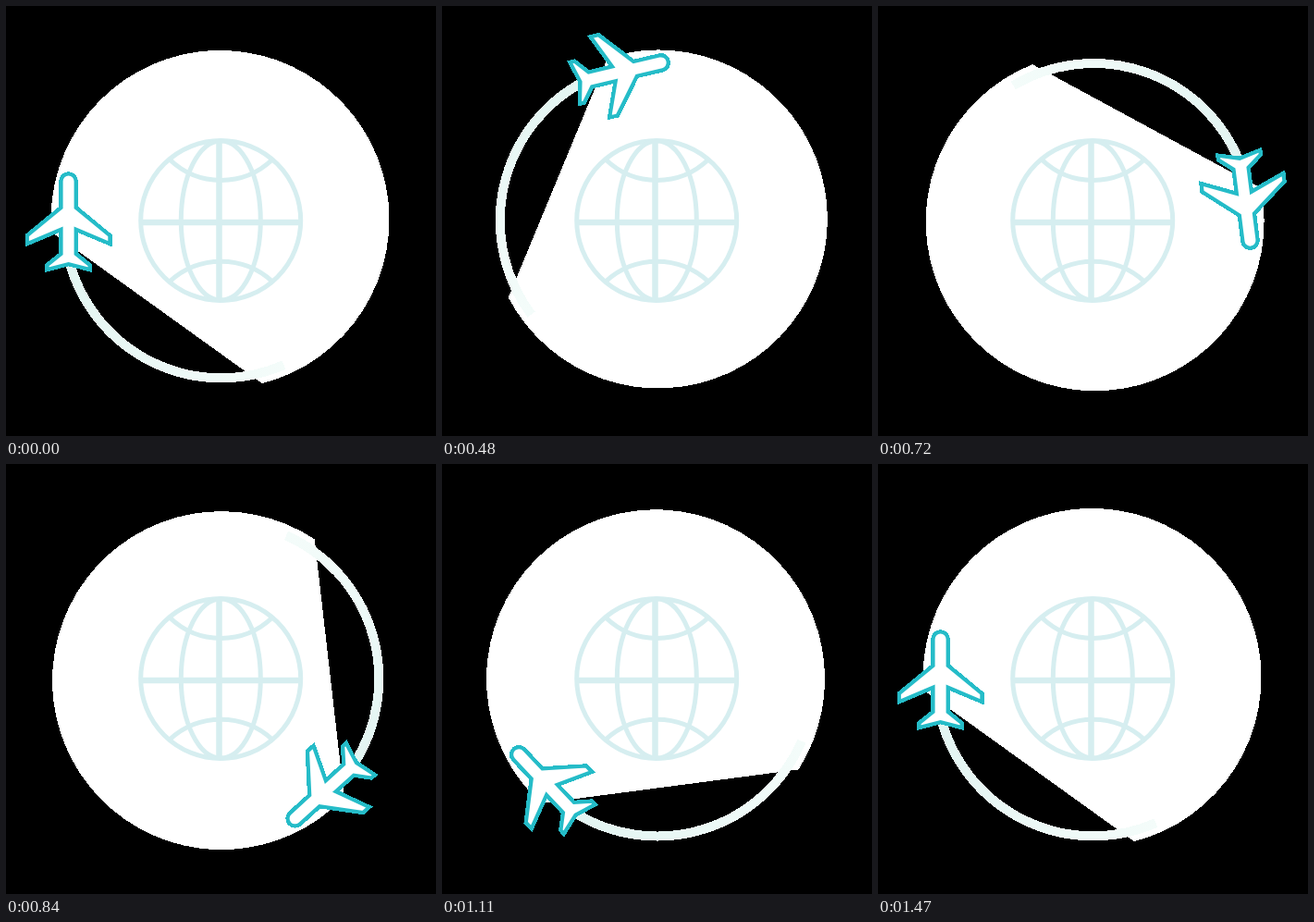
Write an HTML page that moves like this. It is 465 px wide and 465 px high and loops after 1530 ms.

```html
<!DOCTYPE html>
<html lang="en">
<head>
<meta charset="utf-8">
<title>Plane circling a globe</title>
<style>
  html, body { margin: 0; width: 100%; height: 100%; overflow: hidden; background: #000; }
  svg { display: block; width: 100vw; height: 100vh; }
  .globe { fill: none; stroke: #d6eef0; stroke-width: 5; }
  .rim { fill: #25bcc8; stroke: #25bcc8; stroke-width: 4.6; }
  .plane { fill: #fff; stroke: #25bcc8; stroke-width: 4; }
  .rim, .sky, .trail { shape-rendering: crispEdges; }
</style>
</head>
<body>
<svg viewBox="0 0 465 465">
  <defs>
    <linearGradient id="fade" gradientUnits="userSpaceOnUse" x1="70" y1="285" x2="300" y2="390">
      <stop offset="0" stop-color="#e3f5f2"/>
      <stop offset="1" stop-color="#f4fcfa"/>
    </linearGradient>
    <path id="jet" d="M59.6 189.5a8 8 0 0 1 16 0V218L112.3 248.3V257L75.6 241.6V268L90.6 280.2V285L67.6 279
      L44.6 285V280.2L59.6 268V241.6L22.9 257V248.3L59.6 218Z"/>
  </defs>

  <g id="orbit">
    <path class="sky" fill="#fff" d="M277 408.2A183 183 0 1 0 49 244.3Z"/>
    <path class="trail" fill="none" stroke="url(#fade)" stroke-width="10" d="M68.4 276A170 170 0 0 0 300.5 388.2"/>
    <use class="rim" href="#jet"/>
    <use class="plane" href="#jet"/>
  </g>

  <g class="globe">
    <circle cx="232.2" cy="232" r="86.5"/>
    <ellipse cx="232.3" cy="232" rx="43" ry="86"/>
    <path d="M177 166A80 80 0 0 0 288 166M177 298A82 82 0 0 1 288 298"/>
    <path stroke-width="6.5" d="M230.5 146V319M146 234H319"/>
  </g>
</svg>
<script>
  const LOOP = 1530, TURN = 1470, STEP = 30, CENTER = '233 232.2';
  const orbit = document.getElementById('orbit');

  const easeInOut = p => p < 0.5 ? 2 * p * p : 1 - 2 * (1 - p) ** 2;

  function draw(now) {
    const t = Math.floor(((now + 0.5) % LOOP) / STEP) * STEP;
    const angle = 360 * easeInOut(Math.min(t / TURN, 1));
    orbit.setAttribute('transform', `rotate(${angle} ${CENTER})`);
    requestAnimationFrame(draw);
  }
  requestAnimationFrame(draw);
</script>
</body>
</html>
```
